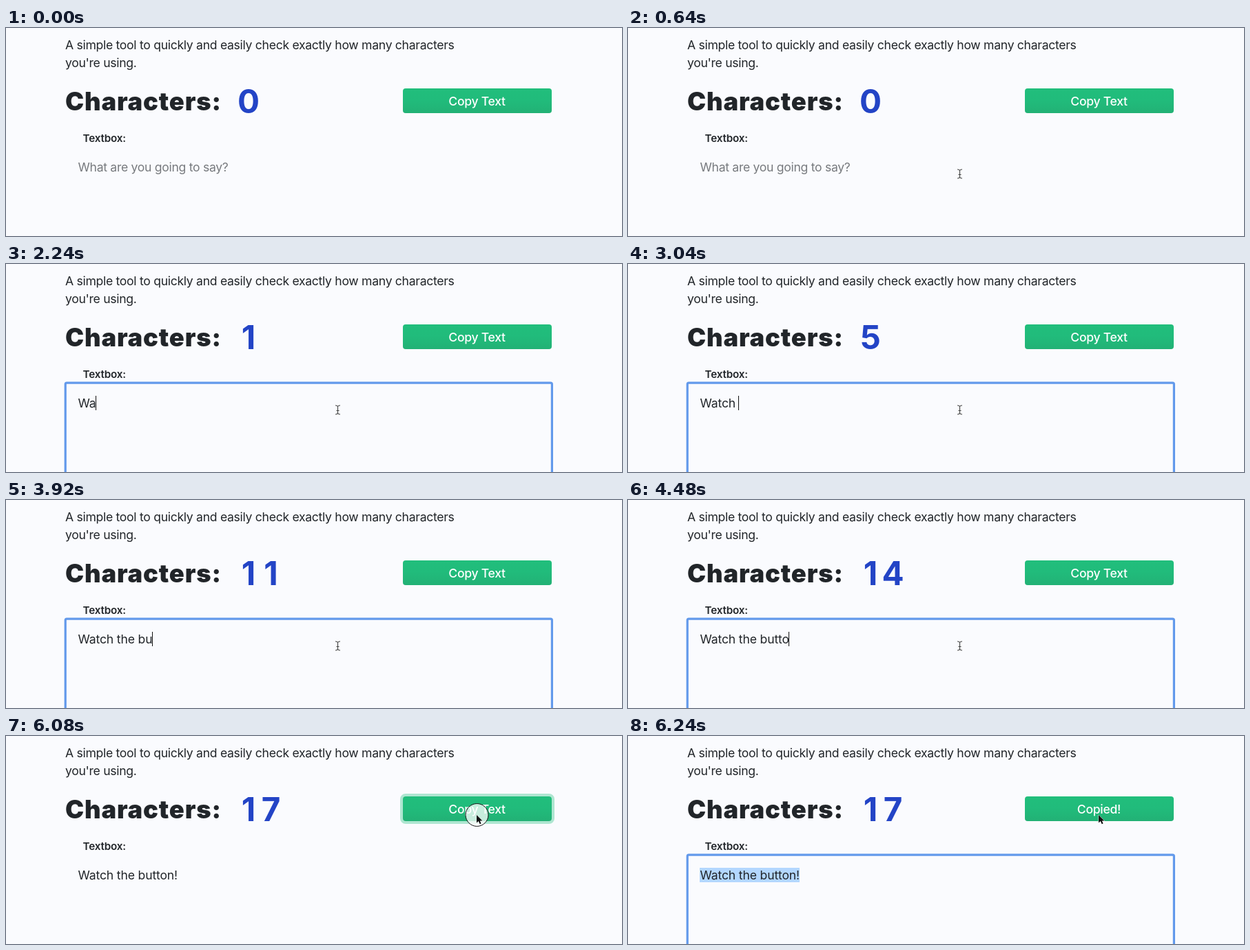
Write an HTML page that moves like this. It is 894 px wide and 303 px high and loops after 8000 ms.

```html
<!DOCTYPE html>
<html lang="en">
<head>
<meta charset="utf-8">
<title>Character counter</title>
<style>
  html, body { margin: 0; width: 100%; height: 100%; overflow: hidden; background: #fafbfe; }
  svg { display: block; width: 894px; height: 303px; }
  text { font: 400 17.6px Inter, sans-serif; letter-spacing: -.3px; fill: #212529; white-space: pre; }
  #title { font-size: 36.3px; font-weight: 900; letter-spacing: .85px; }
  #count { font-size: 47.5px; font-weight: 700; letter-spacing: 0; fill: #2344c6; text-anchor: middle; }
  #name { font-size: 15.2px; font-weight: 600; letter-spacing: -.15px; }
  #hint { fill: #777a7e; }
  #typed { letter-spacing: -.16px; }
  #label { font-weight: 500; fill: #fff; text-anchor: middle; }
</style>
</head>
<body>
<svg viewBox="0 0 894 303">
  <defs>
    <linearGradient id="green" x2="0" y2="1">
      <stop offset="0" stop-color="#21be7c"/>
      <stop offset=".5" stop-color="#21bb7b"/>
      <stop offset="1" stop-color="#22b175"/>
    </linearGradient>
  </defs>
  <text x="86" y="31">A simple tool to quickly and easily check exactly how many characters</text>
  <text x="86" y="57">you're using.</text>
  <text id="title" x="86" y="120">Characters:</text>
  <text id="count" x="352 384.5" y="124">0</text>
  <rect id="halo" x="574" y="86" width="220" height="40" rx="6" fill="none" stroke="#21be7c" stroke-opacity=".35" stroke-width="4"/>
  <rect x="576" y="88" width="216" height="36" rx="4" fill="url(#green)"/>
  <text id="label" x="683.5" y="113">Copy Text</text>
  <text id="name" x="111.5" y="166">Textbox:</text>
  <rect id="ring" x="86.2" y="173.2" width="706.2" height="200" rx="2" fill="none" stroke="#6299eb" stroke-width="3.2"/>
  <rect id="mark" x="104" y="192" height="21" fill="#b3d7ff"/>
  <text id="hint" x="104.5" y="209">What are you going to say?</text>
  <text id="typed" x="104.5" y="209"></text>
  <rect id="caret" y="192" width="1" height="21" fill="#111"/>
  <g id="pointer">
    <circle id="press" cx=".5" r="16.5" fill="#fff" fill-opacity=".75" stroke="#111"/>
    <path id="beam" d="M-3.5-6.5Q0-6.5 0-4V4Q0 6.5-3.5 6.5M3.5-6.5Q0-6.5 0-4M0 4Q0 6.5 3.5 6.5M-2 1H2" transform="translate(.5 .5)" fill="none" stroke="#444" stroke-width="1.1"/>
    <path id="arrow" d="M0 0V13.5L3.2 10.6L5.4 15.5L7.7 14.5L5.6 9.8H9.8Z" transform="scale(.86)" fill="#111" stroke="#fff" paint-order="stroke"/>
  </g>
</svg>
<script>
const LOOP = 8000, TICK = 80;
const MESSAGE = "Watch the button!";

// the typing speed is steady between these points: time, letters
const pace = [[1920, 1], [2880, 4], [3120, 7], [4240, 14], [4640, 16], [5120, 17]];

const el = id => document.getElementById(id);
const show = (id, on) => el(id).style.display = on ? "" : "none";
const within = (t, a, b) => t >= a && t < b;
const progress = (t, start, span) => Math.min(1, Math.max(0, (t - start) / span));
const easeOut = (k, power) => 1 - (1 - k) ** power;

function lettersAt(t) {
  if (t < pace[0][0]) return 0;
  const i = pace.findIndex(p => p[0] > t);
  if (i < 0) return MESSAGE.length;
  const [t0, n0] = pace[i - 1], [t1, n1] = pace[i];
  return Math.floor(n0 + (n1 - n0) * (t - t0) / (t1 - t0) + 1e-6);
}

// rises into the box, then glides up to the button
function pointerAt(t) {
  const enter = easeOut(progress(t, 240, 240), 2);
  const leave = progress(t, 5280, 680);
  return [
    481 + 202 * easeOut(leave, 3.05),
    247 - 35 * enter - 97 * easeOut(leave, 1.66)
  ];
}

function draw(t) {
  const letters = lettersAt(t);
  const copied = t >= 6240;
  const pressing = within(t, 6080, 6240);
  el("typed").textContent = MESSAGE.slice(0, letters);
  el("count").textContent = lettersAt(t - TICK);
  el("label").textContent = copied ? "Copied!" : "Copy Text";
  show("hint", letters === 0);
  show("ring", t >= 1280 && !pressing);
  show("halo", pressing);

  const width = letters ? el("typed").getComputedTextLength() : 0;
  el("caret").setAttribute("x", Math.round(104 + width));
  show("caret", within(t, 1280, 1760) || within(t, 1920, 5680));
  el("mark").setAttribute("width", Math.round(width + .5));
  show("mark", copied);

  const [x, y] = pointerAt(t);
  const inBox = y > 172;
  el("pointer").setAttribute("transform", `translate(${x} ${y})`);
  show("pointer", t >= 240);
  show("beam", inBox);
  show("arrow", !inBox);
  show("press", within(t, 480, 640) || within(t, 1280, 1360) || pressing);
}

const start = performance.now();
function frame() {
  const t = (performance.now() - start) % LOOP;
  draw(Math.floor(t / TICK) * TICK);
  requestAnimationFrame(frame);
}
frame();
</script>
</body>
</html>
```
